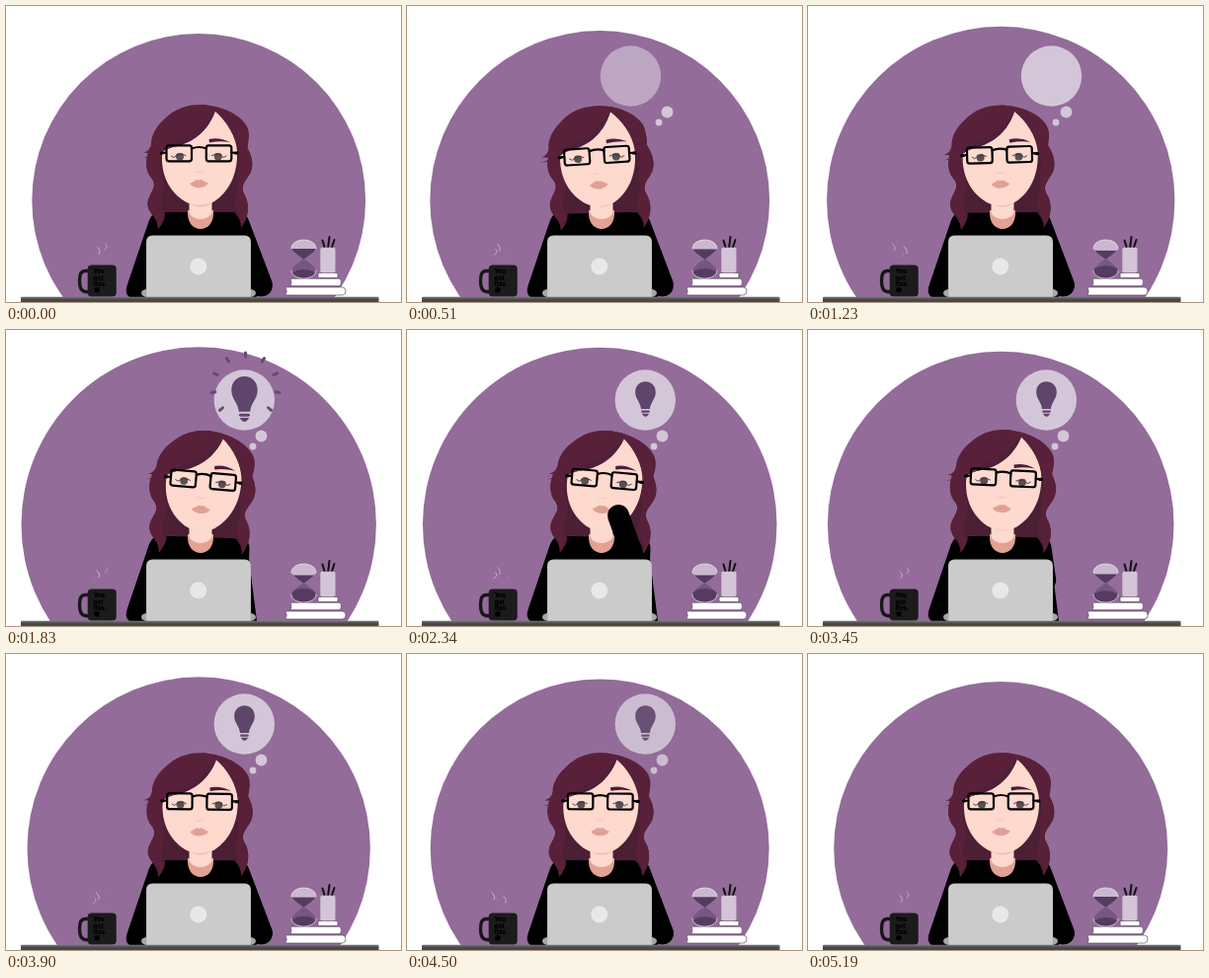
An HTML page that plays this animation: 400 by 300 pixels, repeating every 5.22 s.

```html
<!DOCTYPE html>
<html lang="en">
<head>
<meta charset="utf-8">
<title>Idea at the desk</title>
<style>
  html, body { margin: 0; width: 100%; height: 100%; overflow: hidden; background: #fff; }
  svg { display: block; width: 100vw; height: 100vh; }
  .line { fill: none; stroke-linecap: round; stroke-linejoin: round; }
  .mug text { font: 900 6px Inter, "Open Sans", sans-serif; fill: #000; }
</style>
</head>
<body>
<svg viewBox="0 0 400 300">
  <defs>
    <clipPath id="aboveDesk"><rect width="400" height="296"/></clipPath>
    <clipPath id="topBulb"><path d="M289 246C289 234 314 234 314 246Q313 249 301.500 257Q290 249 289 246Z"/></clipPath>
    <clipPath id="lowBulb"><path d="M301.500 256Q313 264 314 268C314 279 289 279 289 268Q290 264 301.500 256Z"/></clipPath>
    <linearGradient id="deskTop" x2="0" y2="1"><stop stop-color="#777"/><stop offset=".5" stop-color="#484648"/></linearGradient>
  </defs>

  <circle id="backdrop" cx="195.2" cy="197" r="169" fill="#936c9a" clip-path="url(#aboveDesk)"/>

  <g fill="#d3c6d8">
    <circle id="dotSmall" cy="118" r="3.4"/>
    <circle id="dotMedium" cy="107.5" r="5.9"/>
    <circle id="cloud" cy="71" r="30.7"/>
  </g>
  <g id="rays" class="line" stroke="#674a73" stroke-width="3"></g>
  <g id="bulb" fill="#5f446b">
    <path d="M-10.3 -7C-10.3 -21.500 10.300 -21.500 10.300 -7C10.300 0 5 3 4.500 10H-4.500C-5 3 -10.300 0 -10.300 -7Z"/>
    <rect x="-4.300" y="11.500" width="8.600" height="2.300" rx="1.100"/>
    <path d="M-3.700 14.800H3.700Q2 18 0 18Q-2 18 -3.700 14.800Z"/>
  </g>

  <!-- body -->
  <path d="M125 295Q119.500 291 123 282L145 217Q148.500 208.700 155 208.700H236Q242 208.700 244 216L254 295Z"/>
  <path id="upperArm" class="line" stroke="#000" stroke-width="23"/>

  <g id="backHair">
    <path fill="#4c1f35" d="M196 101C172 101 155 119 148 142C141 150 140 165 147 174C156 185 141 191 144 204C146 212 154 214 154 226Q162 217 161 209H231Q238 216 238 225C246 214 247 202 242 192C236 182 243 178 248 168C251 160 249 150 243 142C246 124 230 101 196 101Z"/>
    <path fill="#592139" d="M150 138C140 150 140 166 147 174C156 185 141 191 144 204C146 212 154 214 154 226C164 214 156 207 157 198C159 186 163 183 157 168Q155 155 158 140ZM241 138C249 150 251 160 248 168C243 178 236 182 242 192C247 202 246 214 238 225C240 212 231 208 232 198C234 188 237 180 234 168C237 160 236 150 235 142Z"/>
  </g>
  <path fill="#e2a294" d="M184 207H210C211 220 204 226 197 226S183 220 184 207Z"/>
  <path fill="#fdd9ce" d="M185.500 190H208.500V209C208 213 202 216 197 216S186 213 185.500 209Z"/>
  <path fill="#eebdb0" d="M185.500 198H208.500V200Q197 207 185.500 200Z"/>

  <g id="head">
    <path fill="#fdd9ce" d="M211 106C223 116 233 132 234 147C235 170 226 188 211 198C202 203 190 203 181 198C165 188 157 171 158 151C160 130 187 113 211 106Z"/>
    <path fill="#592139" d="M211 106L197 100C221 101 238 111 244 122C249 133 243 140 245 151L235 150C234 133 224 116 211 106Z"/>
    <path class="line" stroke="#f2c4b8" stroke-width="1" d="M191.500 168Q195 170 198.500 168"/>
    <path fill="#e0a095" d="M186 180C190 178.500 192 175.800 194 176Q195.500 177 197 176C199 175.800 201 178.500 205 179.500C201 185.600 190 185.600 186 180Z"/>
    <g id="eyes">
      <circle cx="176" cy="152.500" r="4" fill="#4d4447"/>
      <circle cx="214.800" cy="152.500" r="4" fill="#4d4447"/>
      <path fill="#fdd9ce" d="M168 152Q176 146 183 151V146H168ZM208 151Q215 146 223 152V146H208Z"/>
      <path class="line" stroke="#33242b" stroke-width=".9" d="M167.500 152L170 153.500Q176 148 182 151.500M208.500 151.500Q215 148 220 153.500L223 152"/>
    </g>
    <path fill="#592139" d="M212 106C205 126 190 139 169 143C160 145 153 153 137 154.500Q145 153 148 149.500L139 148.500Q146 147 147 140C147 130 153 121 161 114C171 104 184 99.500 198 100Q207 100 212 106Z"/>
    <path fill="#4e2039" d="M212 106C205 126 190 139 169 143Q162 145 157 149Q163 142 174 136C194 127 203 117 212 106Z"/>
    <path fill="#4a1d3c" d="M205.500 135Q216 132.500 227 138Q216 136.500 206 138.500Z"/>
    <g id="glasses" class="line" stroke="#000" stroke-width="2.200">
      <rect x="162.500" y="141.300" width="25.500" height="16" rx="2.500" fill="#fff" fill-opacity=".07"/>
      <rect x="202.800" y="141.300" width="25.500" height="16" rx="2.500" fill="#fff" fill-opacity=".07"/>
      <path d="M188 144.500Q195.400 141.500 203 144.500M162 148.500L157 149.200M228.500 148.500L234 149.200"/>
      <path stroke-width="3.200" d="M157.200 149H158.500M232.500 149H234"/>
    </g>
  </g>
  <path id="forearm" class="line" stroke="#000" stroke-width="22"/>

  <!-- laptop -->
  <ellipse cx="143" cy="291" rx="6" ry="4" fill="#aaa3ad"/>
  <ellipse cx="247" cy="291" rx="6" ry="4" fill="#aaa3ad"/>
  <path fill="#bdbdbd" d="M142 295V239Q142 232.500 148.500 232.500H241.500Q248 232.500 248 239V295Z"/>
  <path fill="#cbcbcb" d="M142.600 295V239.500Q142.600 233.200 148.600 233.200H241.400Q247.400 233.200 247.400 239.500V295Z"/>
  <circle cx="194.800" cy="264" r="8.500" fill="#e8e8e8"/>

  <!-- mug -->
  <g id="steam" class="line" stroke="#d9c5dd" stroke-width="1"></g>
  <g class="mug">
    <path class="line" stroke="#171717" stroke-width="3.400" d="M84 268.500H80Q74.500 268.500 74.500 278.500Q74.500 289 80 289.500L85 290"/>
    <rect x="82.700" y="262.600" width="29" height="32" rx="4" fill="#1b1b1b"/>
    <text x="88.500" y="271.300">You</text><text x="88.500" y="277.800">got</text><text x="88.500" y="284.300">this.</text>
    <circle cx="92" cy="287.700" r="2.800"/>
  </g>

  <!-- books, pencils, hourglass -->
  <g fill="#fff" stroke="#49364f" stroke-width=".6">
    <path d="M284 285H340.500Q344 285 344 289T340.500 293H284Q282.500 293 283.500 291.500Q285 289 283.500 287Q282.500 285.300 284 285Z"/>
    <path d="M289 276.300H337Q339.500 276.300 339.500 280T337 283.700H289Q287.500 283.500 288.500 282.300Q289.500 280 288.500 278Q287.500 276.500 289 276.300Z"/>
    <rect x="316" y="270.500" width="20" height="5" rx="1.500"/>
  </g>
  <path class="line" stroke="#111" stroke-width="2" d="M323 246L320.500 237.500M326 246L327.500 234M329.500 246L332.500 237"/>
  <rect x="318.300" y="244.800" width="15.200" height="25.500" rx="1.800" fill="#d3c4d8"/>
  <g clip-path="url(#topBulb)"><rect x="288" y="236" width="27" height="22" fill="#c9b8d0"/><rect id="sandTop" x="288" width="27" height="22" fill="#553b60"/></g>
  <g clip-path="url(#lowBulb)"><rect x="288" y="256" width="27" height="23" fill="#765781"/><path id="sandLow" fill="#553b60"/></g>
  <path class="line" stroke="#ede4ef" stroke-width=".8" d="M289 246C289 234 314 234 314 246M289 268C289 279 314 279 314 268"/>

  <rect x="15" y="294.700" width="362.500" height="6" rx="1" fill="url(#deskTop)"/>
</svg>
<script>
const LOOP = 5220, STEP = 30;
const svgNS = "http://www.w3.org/2000/svg";
const $ = id => document.getElementById(id);
const set = (el, attrs) => { for (const k in attrs) el.setAttribute(k, attrs[k]); };
const add = (parent, n) => Array.from({ length: n }, () =>
  parent.appendChild(document.createElementNS(svgNS, "path")));
const clamp = x => Math.min(1, Math.max(0, x));
const ease = x => x * x * (3 - 2 * x);
const mix = (a, b, p) => a + (b - a) * p;
const ramp = (t, a, b) => ease(clamp((t - a) / (b - a)));

// Each key is [time, value].
function track(t, keys, curve = ease) {
  let i = 1;
  while (i < keys.length - 1 && t > keys[i][0]) i++;
  const [a, from] = keys[i - 1], [b, to] = keys[i];
  return mix(from, to, curve(clamp((t - a) / (b - a))));
}

const rays = add($("rays"), 9), wisps = add($("steam"), 3);

function drawThought(t) {
  const out = 1 - ramp(t, 4400, 4900);
  const place = (id, start, end, keys) => set($(id), {
    cx: track(t, keys), opacity: ramp(t, start, end) * out
  });
  place("dotSmall", 120, 400, [[0, 257], [510, 255], [1230, 251], [1700, 250]]);
  place("dotMedium", 200, 510, [[0, 264], [510, 263.5], [1230, 261.5], [1750, 258.5]]);
  place("cloud", 300, 650, [[300, 222], [510, 226.5], [1170, 246.7], [1230, 246.5], [1750, 241.3]]);

  const scale = track(t, [[1440, 0], [1800, 1.28], [1950, 1.28], [2280, 1]]);
  set($("bulb"), {
    transform: `translate(241.500 70) scale(${scale})`,
    opacity: t < 1440 ? 0 : out
  });

  const reach = track(t, [[1560, 24], [1830, 33], [2220, 36]]);
  set($("rays"), { opacity: ramp(t, 1560, 1740) * (1 - ramp(t, 1980, 2220)) });
  rays.forEach((ray, i) => set(ray, {
    d: `M0 ${-reach - 2}V${-reach + 2}`,
    transform: `translate(242.500 58) rotate(${(i - 4) * 33})`
  }));
}

function drawPerson(t) {
  const tilt = track(t, [[0, 0], [510, -3.6], [780, -3.6], [1230, -1.6], [1800, 5], [2940, 5], [3900, .7], [LOOP, 0]]);
  const slip = track(t, [[0, 0], [510, 1], [1830, 1], [2910, -1], [3900, 0], [LOOP, 0]]);
  const nod = Math.abs(tilt) * .35;
  set($("head"), { transform: `translate(0 ${nod}) rotate(${tilt} 195 200)` });
  set($("backHair"), { transform: `translate(${nod} ${nod * .5}) rotate(${tilt * .4} 195 200)` });
  set($("glasses"), { transform: `translate(0 ${slip})` });

  const pull = ramp(t, 1380, 1830) * (1 - ramp(t, 3300, 3780));
  const lift = ramp(t, 1620, 2340) * (1 - ramp(t, 3120, 3600));
  const elbow = [mix(258.5, 234, pull), mix(283, 244, pull)];
  const hand = [mix(234, 214, lift), mix(283, 188, lift)];
  set($("upperArm"), { d: `M235 221L${elbow}` });
  set($("forearm"), { d: `M${elbow}L${hand}` });
}

function drawProps(t) {
  wisps.forEach((wisp, i) => {
    const p = (t / 1740 + i * .37) % 1;
    const x = 88 + i * 6, y = 256 - 12 * p, sway = 2 * Math.sin(p * 6.28 + i);
    set(wisp, {
      d: `M${x} ${y}q${3 + sway} -3 ${sway} -6q-2 -2 -1 -4`,
      opacity: .85 * Math.sin(Math.PI * p),
      "stroke-dasharray": `${5 + 3 * Math.sin(Math.PI * p)} 20`
    });
  });
  const drained = track(t, [[0, 0], [1830, 1], [2910, 1], [3900, .25], [LOOP, 0]]);
  const low = mix(268, 263, drained);
  set($("sandTop"), { y: mix(246, 248.5, drained) });
  set($("sandLow"), { d: `M288 ${low + 3}Q301.500 ${low - 5} 315 ${low + 3}V279H288Z` });
}

function draw(t) {
  set($("backdrop"), { r: track(t, [[0, 168.9], [1980, 180.6], [LOOP, 168.9]], x => x) });
  drawThought(t);
  drawPerson(t);
  drawProps(t);
}

const start = performance.now();
function frame(now) {
  const t = Math.max(0, now - start) % LOOP;
  draw(Math.floor(t / STEP) * STEP);
  requestAnimationFrame(frame);
}
draw(0);
requestAnimationFrame(frame);
</script>
</body>
</html>
```
